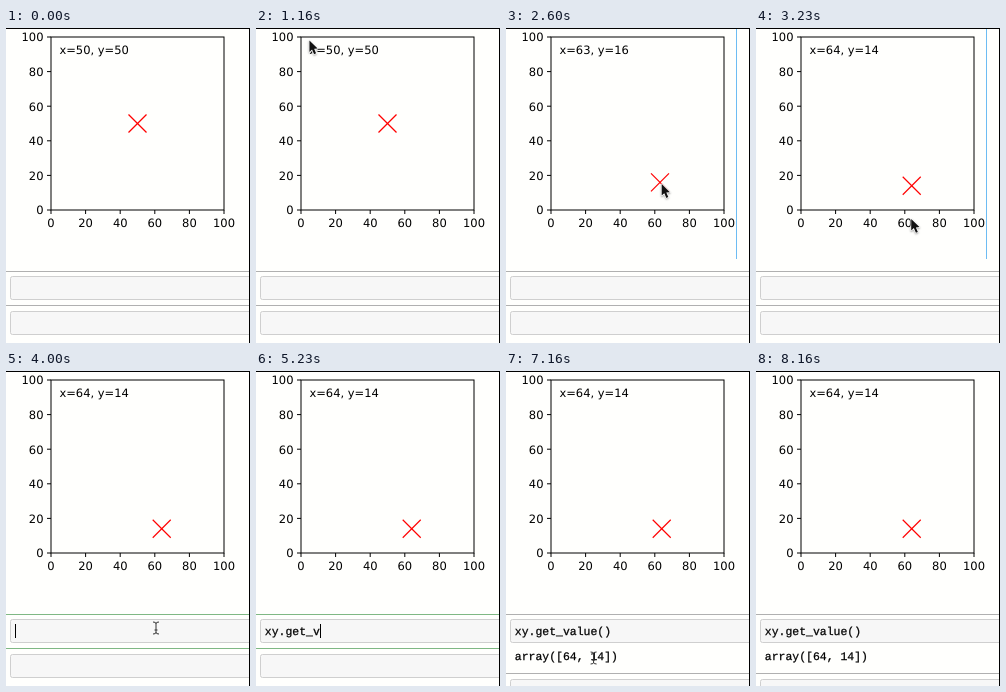
Write an HTML page with a canvas that moves like this. It is 244x315 px and loops after 9.4 s.

```html
<!DOCTYPE html>
<html lang="en">
<head>
<meta charset="utf-8">
<title>Interactive point picker</title>
<style>
html, body { margin: 0; width: 100%; height: 100%; overflow: hidden; background: #fffffd; }
canvas { display: block; width: 244px; height: 315px; }
</style>
</head>
<body>
<canvas id="stage"></canvas>
<script>
const W = 244, H = 315, LOOP = 9400;
const canvas = document.getElementById('stage');
const ctx = canvas.getContext('2d');
const dpr = window.devicePixelRatio || 1;
canvas.width = W * dpr;
canvas.height = H * dpr;
ctx.textRendering = 'geometricPrecision';

const CODE_X = 8.8, CHAR_W = 6.88;
const CODE_FONT = '11.46px "Liberation Mono", monospace';
const PLOT_FONT = '11.5px "DejaVu Sans", sans-serif';

const DRAG = 2200, DROP = 2680, FOCUS = 3560, RUN = 5830, OUTPUT = 6000;
const KEY_GAP = 60, BLINK = 200;

// Typing comes in bursts, each finished at its own time
const BURSTS = [
  { text: 'xy', end: 4130 },
  { text: '.get', end: 4660 },
  { text: '_', end: 4960 },
  { text: 'value', end: 5430 },
  { text: '()', end: 5630 },
];
const KEYS = BURSTS.flatMap(({ text, end }) =>
  [...text].map((char, i) => ({ char, time: end - (text.length - 1 - i) * KEY_GAP })));

// Each move goes on from where the one before ended; sag bends its path
const ENTRY = { x: 221, y: 80 };
const MOVES = [
  { from: 500, to: 1160, x: 53, y: 12, sag: -18 },
  { from: 1160, to: 1430, x: 121, y: 19 },
  { from: 1460, to: 2000, x: 130, y: 94 },
  { from: DRAG, to: DROP, x: 157, y: 160 },
  { from: 3030, to: FOCUS, x: 150, y: 257 },
  { from: 6200, to: 6300, x: 139, y: 283 },
  { from: 6300, to: 6730, x: 55, y: 287, sag: 12 },
  { from: 6930, to: 7330, x: 107.5, y: 287 },
  { from: 7860, to: 8160, x: 256, y: 287 },
];

const lerp = (a, b, k) => a + (b - a) * k;
const plotX = v => 45 + 1.73 * v;
const plotY = v => 182 - 1.73 * v;

function progress(t, from, to) {
  const k = Math.min(1, Math.max(0, (t - from) / (to - from)));
  return 0.5 - 0.5 * Math.cos(Math.PI * k);
}

function pointerAt(t) {
  let { x, y } = ENTRY;
  for (const move of MOVES) {
    const k = progress(t, move.from, move.to);
    x = lerp(x, move.x, k);
    y = lerp(y, move.y, k) + (move.sag || 0) * Math.sin(Math.PI * k);
  }
  return { x, y };
}

function line(x1, y1, x2, y2, color, width = 1) {
  ctx.strokeStyle = color;
  ctx.lineWidth = width;
  ctx.beginPath();
  ctx.moveTo(x1, y1);
  ctx.lineTo(x2, y2);
  ctx.stroke();
}

function label(str, x, y, align = 'left') {
  ctx.font = PLOT_FONT;
  ctx.textAlign = align;
  ctx.fillStyle = '#000';
  ctx.fillText(str, x, y);
}

function mono(str, y) {
  ctx.font = CODE_FONT;
  ctx.textAlign = 'left';
  ctx.fillStyle = ctx.strokeStyle = '#000';
  ctx.lineWidth = 0.25;
  ctx.fillText(str, CODE_X, y);
  ctx.strokeText(str, CODE_X, y);
}

function drawPlot(t) {
  ctx.strokeStyle = '#000';
  ctx.lineWidth = 1;
  ctx.strokeRect(plotX(0), plotY(100), 173, 173);
  for (let v = 0; v <= 100; v += 20) {
    const x = plotX(v), y = plotY(v);
    line(x, plotY(0), x, plotY(0) + 4, '#000');
    line(plotX(0) - 4, y, plotX(0), y, '#000');
    label(v, x, 199, 'center');
    label(v, 37.5, y + 4.3, 'right');
  }
  const k = progress(t, DRAG, DROP);
  const vx = Math.round(lerp(50, 64, k)), vy = Math.round(lerp(50, 14, k));
  const x = plotX(vx), y = plotY(vy);
  line(x - 9, y - 9, x + 9, y + 9, '#f00', 1.2);
  line(x - 9, y + 9, x + 9, y - 9, '#f00', 1.2);
  label(`x=${vx}, y=${vy}`, 53.4, 26.4);
}

function inputBox(y) {
  ctx.beginPath();
  ctx.roundRect(4.5, y + 0.5, 260, 23, 2);
  ctx.fillStyle = '#f7f7f7';
  ctx.fill();
  ctx.strokeStyle = '#cfcfcf';
  ctx.lineWidth = 1;
  ctx.stroke();
}

function drawCells(t) {
  const editing = t >= FOCUS && t < RUN;
  const edge = editing ? '#7fb884' : '#b0b0b0';
  const shift = t >= OUTPUT ? 25 : 0;
  line(0, 243.5, W, 243.5, edge);
  line(0, 277.5 + shift, W, 277.5 + shift, edge);
  inputBox(248);
  inputBox(283 + shift);

  const typed = KEYS.filter(key => key.time <= t);
  mono(typed.map(key => key.char).join(''), 264);
  if (t >= OUTPUT) mono('array([64, 14])', 289);

  const idle = t - (typed.length ? typed.at(-1).time : FOCUS);
  if (editing && Math.floor(idle / BLINK) % 2 === 0) {
    const column = Math.min(typed.length, KEYS.length - 1);
    const x = Math.round(CODE_X + column * CHAR_W) + 0.5;
    line(x, 253, x, 267, '#000');
  }
}

function drawArrow() {
  ctx.scale(0.85, 0.85);
  ctx.beginPath();
  ctx.moveTo(0.5, 0.5);
  ctx.lineTo(0.5, 14);
  ctx.lineTo(3.6, 11.2);
  ctx.lineTo(6, 16.7);
  ctx.lineTo(8.3, 15.7);
  ctx.lineTo(6, 10.4);
  ctx.lineTo(10.2, 10.1);
  ctx.closePath();
  ctx.shadowColor = 'rgba(0,0,0,0.35)';
  ctx.shadowBlur = 2 * dpr;
  ctx.shadowOffsetY = dpr;
  ctx.strokeStyle = '#fff';
  ctx.lineWidth = 1.6;
  ctx.lineJoin = 'round';
  ctx.stroke();
  ctx.shadowColor = 'transparent';
  ctx.fillStyle = '#111';
  ctx.fill();
}

function drawBeam() {
  ctx.strokeStyle = '#333';
  ctx.lineWidth = 1;
  ctx.beginPath();
  for (const s of [-1, 1]) {
    ctx.moveTo(-3, 6 * s);
    ctx.quadraticCurveTo(0, 6 * s, 0, 4.5 * s);
    ctx.quadraticCurveTo(0, 6 * s, 3, 6 * s);
  }
  ctx.moveTo(0, -5);
  ctx.lineTo(0, 5);
  ctx.moveTo(-1.5, 2);
  ctx.lineTo(1.5, 2);
  ctx.stroke();
}

function drawPointer(t) {
  const idle = t >= BURSTS[0].end - 2 * KEY_GAP && t < 6230;
  if (t < 500 || idle || t >= 8160) return;
  const { x, y } = pointerAt(t);
  const overInput = y > 248 && y < 272;
  const overOutput = t >= OUTPUT && x < 113 && y > 279 && y < 293;
  ctx.save();
  ctx.translate(x, y);
  if (overInput || overOutput) drawBeam();
  else drawArrow();
  ctx.restore();
}

function draw(t) {
  ctx.setTransform(dpr, 0, 0, dpr, 0, 0);
  ctx.fillStyle = '#fffffd';
  ctx.fillRect(0, 0, W, H);
  drawPlot(t);
  drawCells(t);
  if (t >= DRAG && t < FOCUS) line(230.5, 0, 230.5, 231, '#6dbcf3');
  drawPointer(t);
  line(0, 0.5, W, 0.5, '#000');
  line(243.5, 0, 243.5, H, '#000');
}

const start = performance.now();
function tick() {
  draw((performance.now() - start) % LOOP);
  requestAnimationFrame(tick);
}
tick();
</script>
</body>
</html>
```
